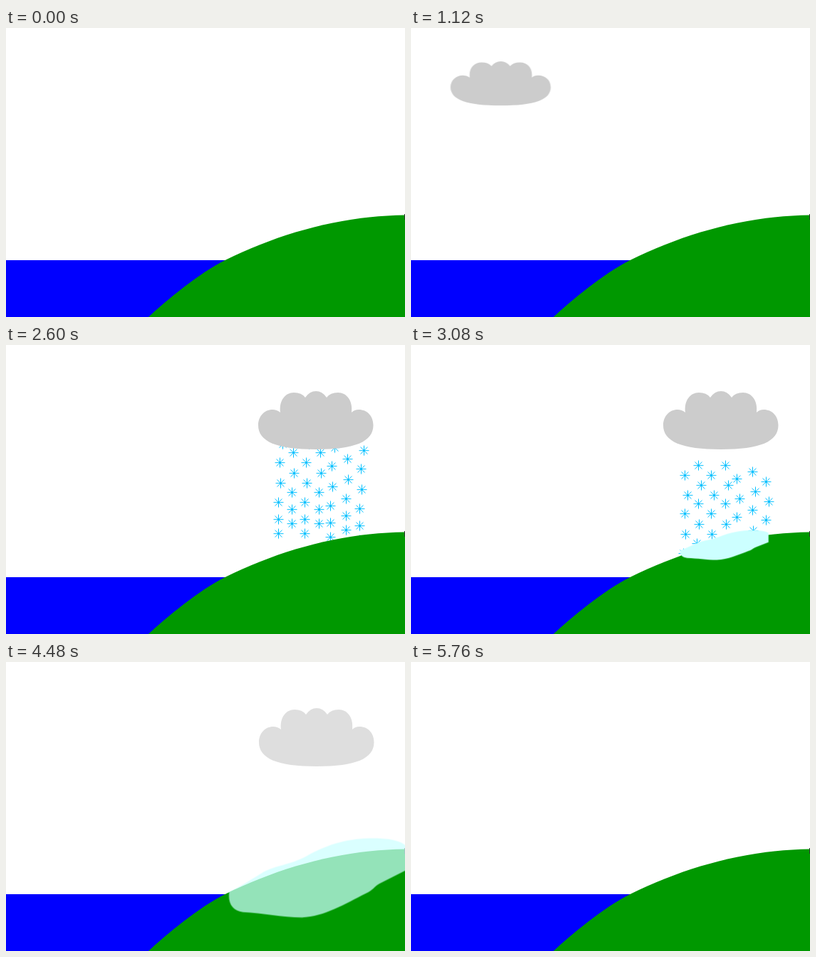
Recreate the animation shown at these times as an HTML page. Size 560x407 px, loop 5800 ms.

```html
<!DOCTYPE html>
<html lang="en">
<head>
<meta charset="utf-8">
<title>Water cycle</title>
<style>
  html, body { margin: 0; width: 100%; height: 100%; overflow: hidden; background: #fff; }
  svg { display: block; width: 100vw; height: 100vh; }

  .cloud, .arrows, .snow, .ice { transform-origin: 0 0; }
  .cloud { fill: #ccc; animation: drift 5.8s linear infinite, haze 5.8s linear infinite; }
  .arrows { fill: #00f; animation: rise 5.8s linear infinite, leave 5.8s step-end infinite; }
  .snow { stroke: #00bfff; stroke-width: 1;
    animation: fall 5.8s linear infinite, snowing 5.8s step-end infinite; }
  .ice { fill: #cff; animation: grow 5.8s linear infinite, melt 5.8s linear infinite; }

  /* Cloud: rises from the sea, drifts to the hill, evaporates */
  @keyframes drift {
    0% { transform: translate(92.5px, 323.6px) scale(.193, .22); }
    12.414% { transform: translate(92.5px, 151.5px) scale(.652, .573); }
    17.931% { transform: translate(93px, 75px) scale(.857, .732); }
    32.414%, 65.172% { transform: translate(435px, 106px) scale(1, 1); }
    66%, 100% { transform: translate(436px, 106px) scale(1, 1); }
  }
  @keyframes haze {
    0% { opacity: 0; }
    17.931%, 65.172% { opacity: 1; }
    99.31%, 100% { opacity: 0; }
  }

  @keyframes rise {
    0% { transform: translateY(314px) scaleY(0); }
    12.414% { transform: translateY(323px) scaleY(1); }
    17.931%, 100% { transform: translateY(327px) scaleY(1.446); }
  }
  @keyframes leave {
    0% { opacity: 0; }
    .69% { opacity: 1; }
    17.931%, 100% { opacity: 0; }
  }

  @keyframes fall {
    0%, 32.414% { transform: translateY(-122px); }
    41.379% { transform: translateY(-30px); }
    44.828% { transform: translateY(0); }
    61.379% { transform: translateY(144px); }
    65.517%, 100% { transform: translateY(180px); }
  }
  @keyframes snowing {
    0% { opacity: 0; }
    32.414% { opacity: 1; }
    65.517%, 100% { opacity: 0; }
  }

  /* Ice: spreads over the slope, then melts away */
  @keyframes grow {
    0%, 45.517% { transform: translate(441.5px, 272px) scale(.225, .02); }
    51.724% { transform: translate(440px, 279px) scale(.526, .38); }
    61.379% { transform: translate(437.5px, 298.5px) scale(1, 1); }
    64.828%, 100% { transform: translate(436.5px, 304px) scale(1.19, 1.25); }
  }
  @keyframes melt {
    0% { opacity: 0; }
    45.517% { opacity: 0; animation-timing-function: step-start; }
    46.207%, 69% { opacity: 1; }
    99.31%, 100% { opacity: 0; }
  }
</style>
</head>
<body>
<svg viewBox="0 0 560 407" preserveAspectRatio="none">
  <defs>
    <path id="arrow" d="M0-139L27.5-104H8V0H-8V-104H-27.5Z"/>
    <path id="flake" d="M-7 0H7M0-7V7M-5-5L5 5M-5 5L5-5"/>
    <clipPath id="below"><rect y="105" width="560" height="302"/></clipPath>
  </defs>

  <g class="arrows">
    <use href="#arrow" x="28.5"/>
    <use href="#arrow" x="94"/>
    <use href="#arrow" x="158.5"/>
  </g>

  <g clip-path="url(#below)"><g class="snow" id="snow"></g></g>

  <g class="cloud">
    <path transform="translate(-435 -106)" d="M354 113C354 100 363 91 374 91Q380 91 385 95
      C383 78 392 67 404 67Q415 67 420 74Q426 65 435 65Q444 65 450 74Q455 67 466 67
      C478 67 487 78 485 95Q489 91 495 91C507 91 515.5 100 515.5 113
      C515.5 136 490 147 435 147C380 147 354 136 354 113Z"/>
  </g>

  <rect y="327" width="320" height="80" fill="#00f"/>
  <path fill="#009800" d="M198 408.8C225 383.8 270 345.8 308 326.8C385 288.8 470 264.8 560 263.5V408.8Z"/>
  <rect x="559" y="262" width="1" height="8" fill="#333"/>

  <g class="ice">
    <path transform="translate(-437.5 -298.5)" d="M334 314C348 308 362 299 374 292
      C390 284 405 284 425 274C455 258 480 253 512 254Q534 255 542 262V290L511 305
      C504 309 504 312 495 316C470 328 446 342 420 343C395 343 375 338 350 337
      C338 336 332 327 334 314Z"/>
  </g>
</svg>
<script>
  // Staggered columns of flakes; rows are [dx, dy] from each column's base
  const columns = [[384, 165], [403, 151], [421, 165], [441, 151], [457, 170], [479, 160], [498, 174]];
  const rows = [[0, -54], [4, -26], [0, 0], [1, 29], [-2, 56], [-2, 80], [-2, 100]];
  const snow = document.getElementById('snow');
  for (const [x, y] of columns) {
    for (const [dx, dy] of rows) {
      const flake = document.createElementNS('http://www.w3.org/2000/svg', 'use');
      flake.setAttribute('href', '#flake');
      flake.setAttribute('x', x + dx + .5);
      flake.setAttribute('y', y + dy + .5);
      snow.append(flake);
    }
  }
</script>
</body>
</html>
```
